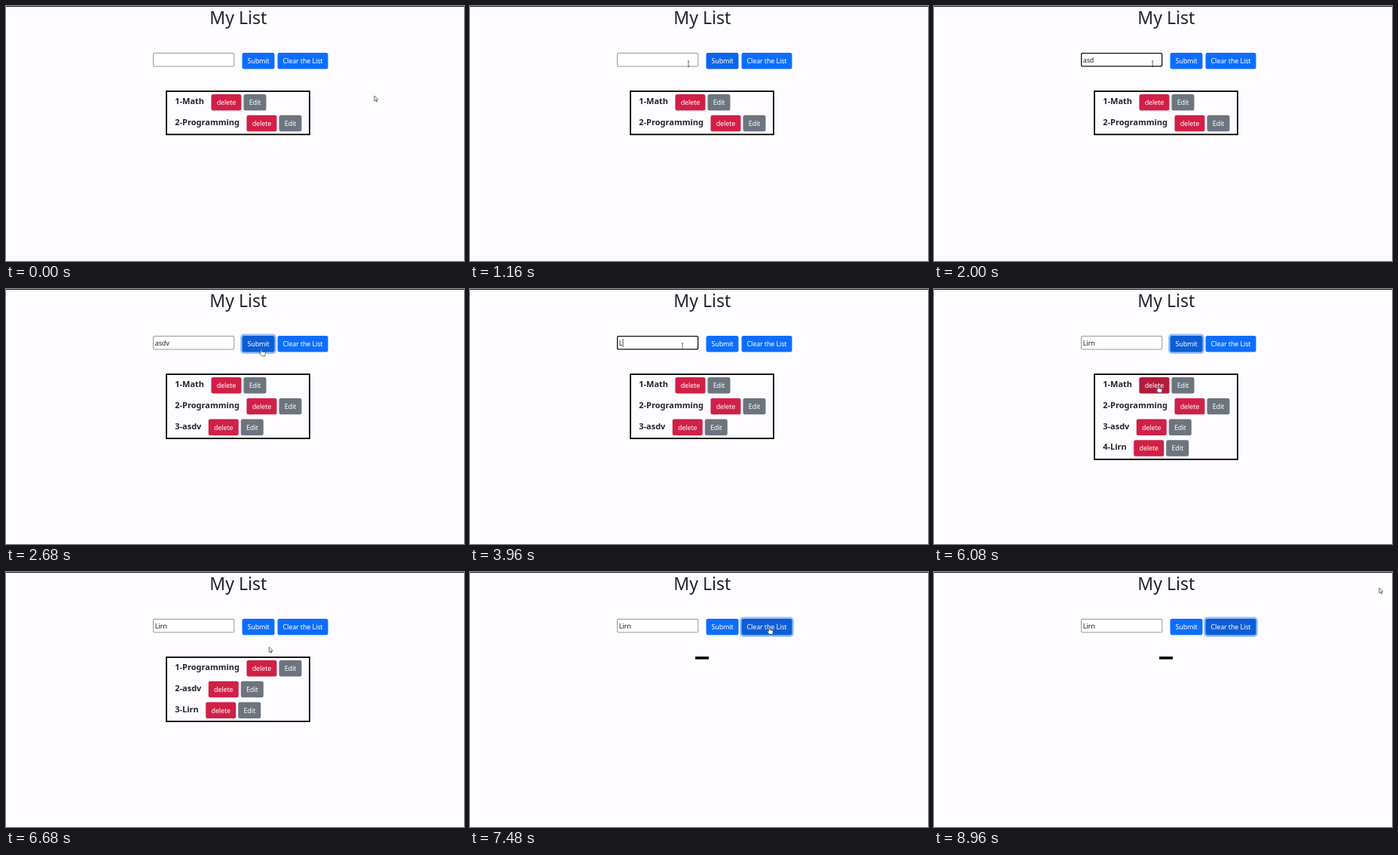
Recreate the animation shown at these times as an HTML page with a canvas. Size 608 by 338 pixels, loop 9 s.

```html
<!DOCTYPE html>
<html lang="en">
<head>
<meta charset="utf-8">
<title>My List</title>
<style>
  html, body { margin: 0; width: 100%; height: 100%; overflow: hidden; background: #fefcff; }
  canvas { display: block; }
</style>
</head>
<body>
<canvas id="stage" width="608" height="338"></canvas>
<script>
const ctx = document.getElementById('stage').getContext('2d');
const LOOP = 9000, GLIDE = 450, CLICK_DELAY = 100, TYPE_DELAY = 300, KEY_TIME = 150;
const ROW = 27.75, BUTTON_H = 21.5, BORDER = 1.8;
const FAMILY = '"Segoe UI", "Open Sans", "Noto Sans", sans-serif';
const TITLE = '500 23px ' + FAMILY, BOLD = '700 11px ' + FAMILY, SMALL = '9px ' + FAMILY;
const BLUE = '#0d6efd', RED = '#d02046', GREY = '#6c757d', INK = '#212529';

// What a click does to the page
const focusInput = word => (s, age) => {
  s.focus = 'input';
  const keys = Math.floor((age - TYPE_DELAY) / KEY_TIME) + 1;
  s.value = word.slice(0, Math.max(0, keys));
  s.caret = age % 1000 < 500;
};
const submit = s => { s.focus = 'Submit'; s.items.push(s.value); };
const removeFirst = s => { s.focus = ''; s.items.shift(); };
const clear = s => { s.focus = 'Clear the List'; s.items = []; };

// The pointer's stops, with the click made at each
const stops = [
  { at: 0, x: 489, y: 119 },
  { at: 400, x: 234, y: 128 },
  { at: 780, x: 330, y: 155 },
  { at: 1090, x: 325, y: 79 },
  { at: 1160, x: 290, y: 77, click: focusInput('asdv') },
  { at: 2440, x: 340, y: 78, click: submit },
  { at: 3100, x: 258, y: 176 },
  { at: 3520, x: 282, y: 76, click: focusInput('Lirn') },
  { at: 4720, x: 338, y: 77, click: submit },
  { at: 5500, x: 270, y: 205 },
  { at: 6020, x: 297.5, y: 128, click: removeFirst },
  { at: 6900, x: 397, y: 73, click: clear },
  { at: 8880, x: 591, y: 21 }
];

function pageAt(t) {
  const s = { focus: '', value: '', items: ['Math', 'Programming'], caret: false };
  for (const { at, click } of stops) {
    const age = t - at - CLICK_DELAY;
    if (click && age >= 0) click(s, age);
  }
  return s;
}

function pointer(t) {
  const i = stops.findIndex(s => s.at > t);
  if (i < 1) return i ? stops.at(-1) : stops[0];
  const a = stops[i - 1], b = stops[i], span = Math.min(GLIDE, b.at - a.at);
  const u = Math.max(0, 1 - (b.at - t) / span), e = u * u * (3 - 2 * u);
  return { x: a.x + (b.x - a.x) * e, y: a.y + (b.y - a.y) * e };
}

const inside = (p, [x, y, w, h]) => p.x >= x && p.x <= x + w && p.y >= y && p.y <= y + h;

// Recent share of time under the pointer gives the 150 ms colour fade
function hover(t, box) {
  let n = 0;
  for (let i = 0; i < 10; i++) n += inside(pointer(t - i * 15), box);
  return n / 10;
}

function text(str, x, y, font, spacing = 0, align = 'left', color = INK) {
  ctx.font = font;
  ctx.letterSpacing = spacing + 'px';
  ctx.textAlign = align;
  ctx.fillStyle = color;
  ctx.fillText(str, x, y);
}

function round(x, y, w, h, r, color) {
  ctx.fillStyle = color;
  ctx.beginPath();
  ctx.roundRect(x, y, w, h, r);
  ctx.fill();
}

function button(view, label, x, y, w, color) {
  const box = [x, y, w, BUTTON_H], focused = view.focus === label;
  const shade = 0.15 * (focused ? 1 : hover(view.t, box));
  if (focused) round(x - 2.4, y - 2.4, w + 4.8, BUTTON_H + 4.8, 4.5, '#98c1fe');
  round(...box, 2.5, color);
  round(...box, 2.5, `rgba(0, 0, 0, ${shade})`);
  text(label, x + w / 2, y + 14, SMALL, -0.15, 'center', '#fff');
  view.zones.push({ kind: 'hand', box });
}

function input(view) {
  const focused = view.focus === 'input', box = [195, 62, 108.3, 18.5];
  const [x, y, w, h] = box, b = focused ? 1.3 : 1;
  round(...box, 2, focused ? '#101010' : '#989898');
  round(x + b, y + b, w - 2 * b, h - 2 * b, 1, '#fff');
  text(view.value, x + 2.7, y + 13, SMALL, -0.1);
  if (focused && view.caret) {
    ctx.fillRect(x + 3 + ctx.measureText(view.value).width, y + 4, 0.8, 11);
  }
  view.zones.push({ kind: 'beam', box });
}

function list(view) {
  const n = view.items.length, w = n ? 190 : 16;
  ctx.strokeStyle = '#000';
  ctx.lineWidth = BORDER;
  ctx.strokeRect(308 - w / 2, 113, w, BORDER + ROW * n);
  view.items.forEach((item, i) => {
    const x = 224.2, y = 117 + ROW * i, label = `${i + 1}-${item}`;
    text(label, x, y + 13.2, BOLD);
    const width = ctx.measureText(label).width, left = x + width + 9.4;
    view.zones.push({ kind: 'beam', box: [x, y + 2, width, 15] });
    button(view, 'delete', left, y, 40, RED);
    button(view, 'Edit', left + 43, y, 30, GREY);
  });
}

const shapes = {
  arrow: new Path2D('M0 0V7L1.7 5.5L2.7 8L3.8 7.5L2.8 5.1H4.9Z'),
  beam: new Path2D('M-1.2 -4H1.2M0 -4V3.5M-1.2 3.5H1.2'),
  hand: new Path2D('M-.7 .5Q0 -.6 .8 .5V3.6L4.7 4.4Q5.7 4.8 5.5 6L4.8 9.5H.5L-2.4 6.2Q-2.5 5 -1.3 5.2L-.7 5.8Z')
};

function drawPointer(view) {
  const p = pointer(view.t), zone = view.zones.find(z => inside(p, z.box));
  const kind = zone ? zone.kind : 'arrow';
  ctx.save();
  ctx.translate(p.x, p.y);
  ctx.lineJoin = 'round';
  ctx.lineWidth = 0.7;
  ctx.strokeStyle = '#333';
  ctx.fillStyle = '#fff';
  if (kind !== 'beam') ctx.fill(shapes[kind]);
  ctx.stroke(shapes[kind]);
  ctx.restore();
}

function draw(t) {
  const view = { ...pageAt(t), t, zones: [] };
  ctx.fillStyle = '#fefcff';
  ctx.fillRect(0, 0, 608, 338);
  ctx.fillStyle = '#1a1a1a';
  ctx.fillRect(0, 0, 608, 1);
  text('My List', 308.3, 24, TITLE, 0, 'center');
  input(view);
  button(view, 'Submit', 313.5, 62, 43, BLUE);
  button(view, 'Clear the List', 360.5, 62, 67, BLUE);
  list(view);
  drawPointer(view);
}

const start = performance.now();
function tick() {
  draw((performance.now() - start) % LOOP);
  requestAnimationFrame(tick);
}
tick();
</script>
</body>
</html>
```
